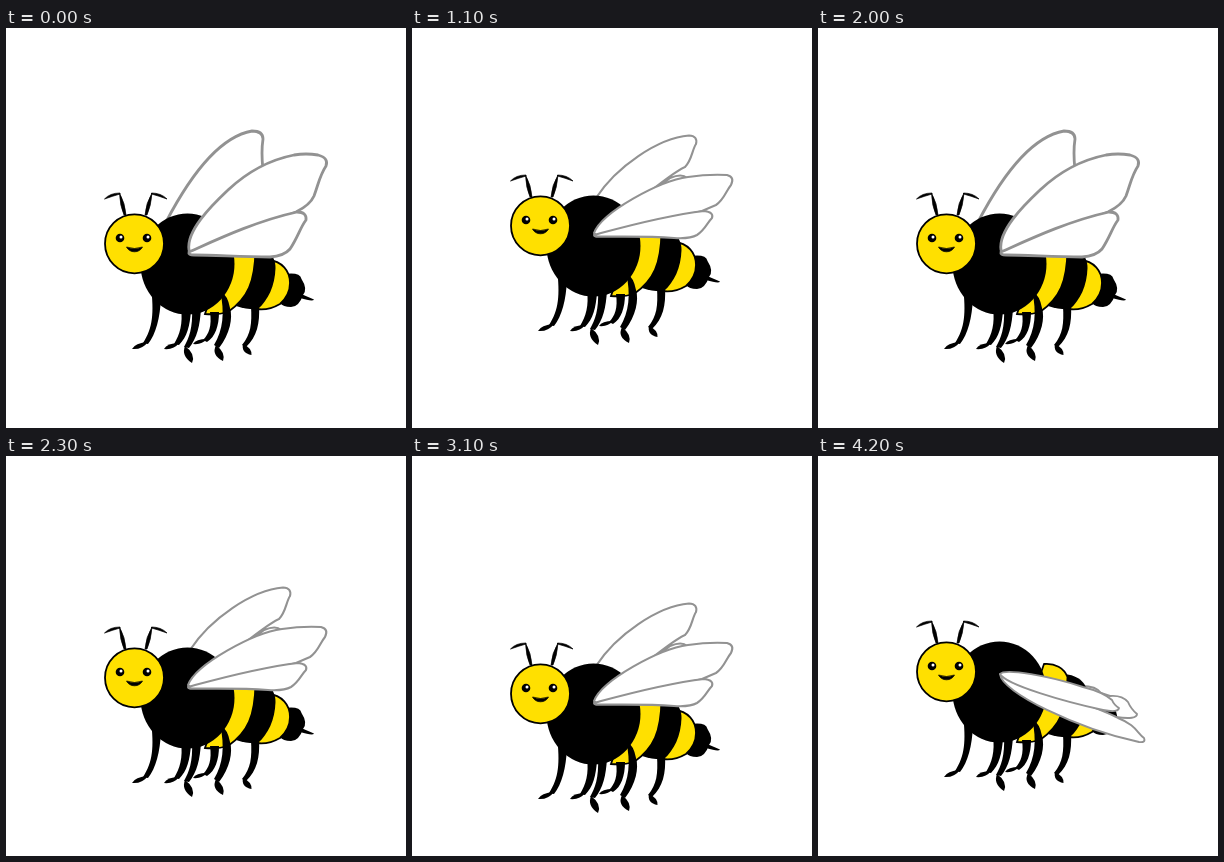
An HTML page that plays this animation: 400x400 px, repeating every 4300 ms.

```html
<!DOCTYPE html>
<html lang="en">
<head>
<meta charset="utf-8">
<title>Bumblebee</title>
<style>
html, body { margin: 0; width: 100%; height: 100%; overflow: hidden; background: #fff; }
svg { display: block; width: 100%; height: 100%; }
.wing path { fill: #fff; stroke: #929292; stroke-linejoin: round; stroke-linecap: round; }
.yellow { fill: #ffe000; stroke: #000; stroke-width: 1.8; }
.inked { stroke: #000; stroke-width: .7; stroke-linejoin: round; }
</style>
</head>
<body>
<svg viewBox="0 0 400 400">
  <g id="bee">
    <g class="wing"><path id="far"/></g>

    <g id="abdomen">
      <path d="M279 246 Q294 244 295.500 251 Q302 261 297 267 Q293 279 285 279 Q277 279 274 275Z"/>
      <path d="M294 265.500 L308 271.500 Q307 274 294 270Z"/>
      <path class="yellow" d="M262 232 C276 233 284 243 284 255 Q284 267 274 276 Q262 283 250 281Z"/>
      <path d="M245 218 C262 219 269.500 228 269.500 240 C269 258 262 272 252 281 Q243 282 230 278Z"/>
      <path class="yellow" d="M226 208 C237 207 246 212 249.500 221 C249 254 242 270 222 284 Q212 287 199 286Z"/>
    </g>
    <ellipse cx="181.500" cy="236" rx="47" ry="50.500"/>

    <g id="legs">
      <path d="M145 258 C148 285 147 300 137 315 L142 316 C150 306 154 290 155 270Z"/>
      <path d="M142 314 Q129 315 126 321 Q136 322 142 314Z"/>
      <path d="M175 280 C177 296 174 306 168 316 L173 317 C181 309 184 298 185 282Z"/>
      <path d="M173 315 Q161 315 158 321 Q168 322 173 315Z"/>
      <path d="M186 280 C187 300 183 310 178 319 L183 320 C191 310 194 298 195 280Z"/>
      <path d="M179 318 Q175 328 186 335 Q190 326 179 318Z"/>
      <path d="M204 284 C206 298 203 306 197 312 L201 314 C209 309 213 298 213 284Z"/>
      <path d="M201 311 Q190 311 187 316 Q196 317 201 311Z"/>
      <path d="M214 262 C219 285 217 302 208 317 L213 320 C224 306 227 290 224 280 Q222 268 214 262Z"/>
      <path d="M210 317 Q205 327 217 333 Q220 325 210 317Z"/>
      <path d="M245 278 C246 296 245 306 236 317 L240 319 C251 309 254 295 253 278Z"/>
      <path d="M237 316 Q235 325 245.500 327 Q246 320 237 316Z"/>
    </g>

    <g class="wing"><path id="upper"/><path id="lower"/></g>

    <g id="antennae" class="inked">
      <path d="M118 187 Q114 178 113.500 165 Q119 175 120 187Z"/>
      <path d="M114 165 Q104 165 98.500 171 Q107 168 114 166Z"/>
      <path d="M141 187 Q145 178 146 165 Q140 175 139 187Z"/>
      <path d="M145.500 165 Q155 165 161 171 Q153 168 145.500 166Z"/>
    </g>
    <circle class="yellow" cx="128.500" cy="215.800" r="29.500"/>
    <circle cx="114" cy="210" r="4.300"/>
    <circle cx="141" cy="210" r="4.300"/>
    <g fill="#fff"><circle cx="115" cy="209" r="1.500"/><circle cx="142" cy="209" r="1.500"/></g>
    <path class="inked" d="M120.500 219 Q128.500 222 136.500 219 Q134 223.800 128.500 223.800 Q123 223.800 120.500 219Z"/>
  </g>
</svg>
<script>
const $ = id => document.getElementById(id);

const up = {
  width: 2.8,
  far: 'M160 194 C183 150 212 109 246 103 Q257 103 257 111 Q255 124 257 142 L200 215Z',
  upper: 'M183 222 C180 203 205 178 222 162 C238 147 258 133 288 127 Q300 125 312 127 Q323 130 320 138 C314 147 313 154 308 168 Q304 177 290 184 L186 226Z',
  lower: 'M183 224 C210 212 250 193 291 184 Q301 184 300 192 C294 200 292 209 284 221 Q278 228 264 229 C235 229 210 227 188 227 Q182 227 183 224Z'
};
const mid = {
  width: 2.1,
  far: 'M184 188 C204 157 246 128 277 125.500 Q286 126 284 134 C280 140 280 150 273 157 Q262 161 200 212Z M258 168 Q270 163 275 168 L200 215Z',
  upper: 'M182 223 C190 202 247 171 276 167 Q296 164 315 165 Q323 167 319 175 C314 181 312 190 304 195 L290 201 L186 226Z',
  lower: 'M182 225 C208 218 250 206 292 201 Q302 202 300 208 C295 213 293 220 285 225 Q278 229 262 228 C235 226 210 227 188 226.500 Q182 227 182 225Z'
};
const down = {
  width: 1.9,
  far: 'M240 225 L264 230 Q278 230 283 237 L292 240 Q304 239 310 246 Q313 253 319 258 Q319 264 298 261Z',
  upper: 'M182 218 C183 236 260 273 321 286 Q328 287 326 282 C319 277 318 269 300 262 Q280 251 182 218Z',
  lower: 'M182 218 C187 212 232 220 265 231 Q285 236 294 244 Q296 249 301 252 Q300 257 285 254 C248 246 188 229 182 218Z'
};
const flap = [up, mid, down, mid];

const STEP = 100, STEPS = 43;

// Two pixels per step: rise, long sink, rise back.
function lift(k) {
  if (k <= 10) return -2 * k;
  if (k <= 31) return 2 * k - 40;
  return 84 - 2 * k;
}

function draw(now) {
  const k = Math.floor(now / STEP) % STEPS;
  const pose = flap[k % 4];
  $('bee').setAttribute('transform', `translate(0 ${lift(k)})`);
  for (const id of ['far', 'upper', 'lower']) {
    $(id).setAttribute('d', pose[id]);
    $(id).setAttribute('stroke-width', pose.width);
  }
  requestAnimationFrame(draw);
}
draw(0);
</script>
</body>
</html>
```
